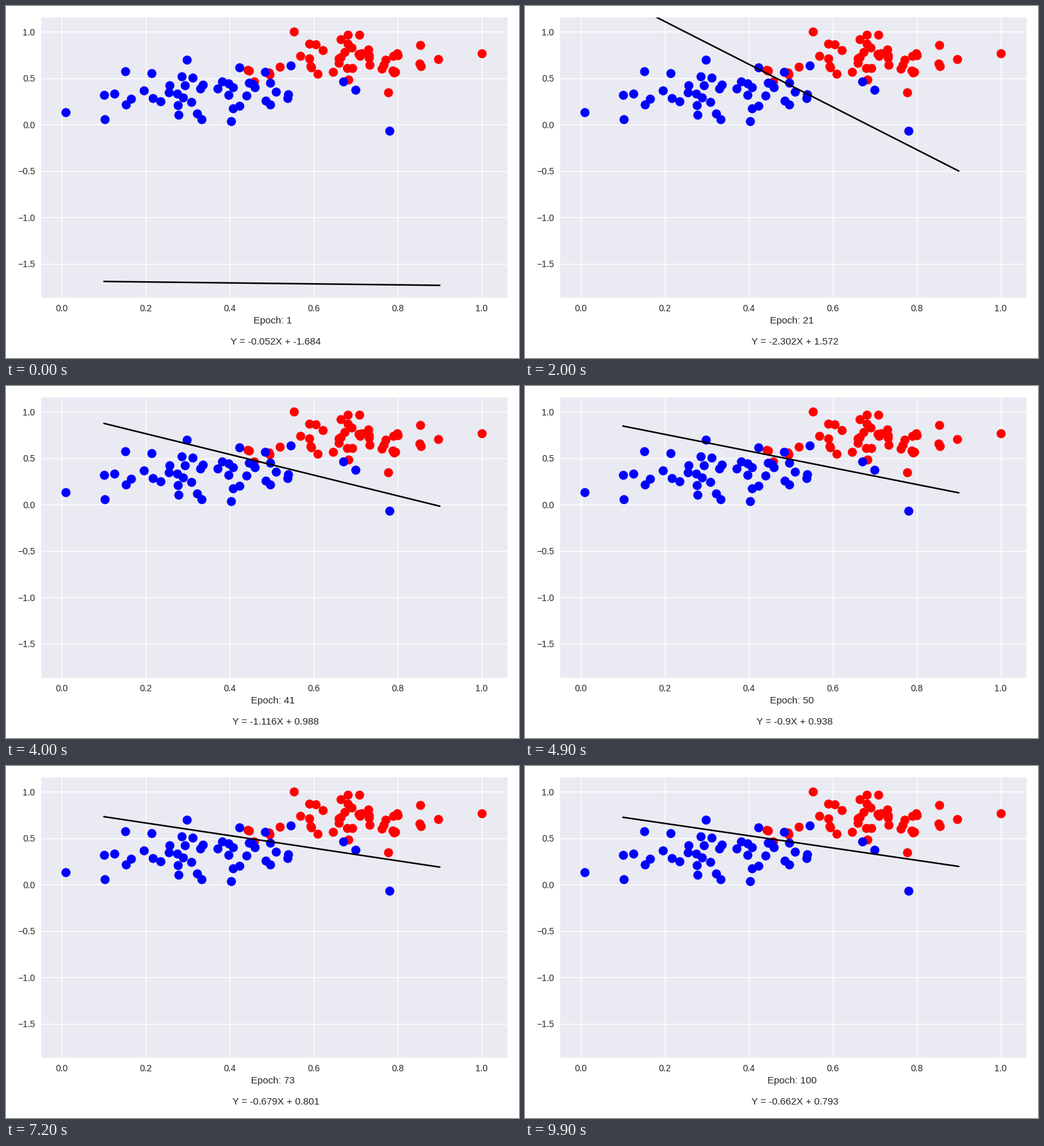
Animation of 800 by 550 pixels, one loop 10 s. Source, as a matplotlib script:

```python
import numpy as np
import matplotlib.pyplot as plt
from matplotlib.animation import FuncAnimation

W, H, DPI = 800, 550, 100
EPOCHS, RATE = 100, 0.01

plt.rcParams.update({
    "font.family": "Liberation Sans",
    "text.color": "0.15",
    "axes.labelcolor": "0.15",
    "axes.labelsize": 11,
    "axes.facecolor": "#EAEAF2",
    "axes.linewidth": 0,
    "axes.axisbelow": True,
    "axes.grid": True,
    "grid.color": "white",
    "grid.linewidth": 1,
    "lines.solid_capstyle": "round",
    "xtick.color": "0.15",
    "ytick.color": "0.15",
    "xtick.labelsize": 10,
    "ytick.labelsize": 10,
    "xtick.major.size": 0,
    "ytick.major.size": 0,
    "xtick.major.pad": 7,
    "ytick.major.pad": 7,
})

# x, y pairs of the two classes
BLUE = np.reshape([
    0.78051, -0.063669, 0.28774, 0.29139, 0.40714, 0.17878, 0.2923, 0.4217,
    0.50922, 0.35256, 0.27785, 0.10802, 0.27527, 0.33223, 0.43999, 0.31245,
    0.33557, 0.42984, 0.23448, 0.24986, 0.0084492, 0.13658, 0.12419, 0.33595,
    0.25644, 0.42624, 0.4591, 0.40426, 0.44547, 0.45117, 0.42218, 0.20118,
    0.49563, 0.21445, 0.30848, 0.24306, 0.39707, 0.44438, 0.32945, 0.39217,
    0.40739, 0.40271, 0.3106, 0.50702, 0.49638, 0.45384, 0.10073, 0.32053,
    0.69907, 0.37307, 0.29767, 0.69648, 0.15099, 0.57341, 0.16427, 0.27759,
    0.33259, 0.055964, 0.53741, 0.28637, 0.19503, 0.36879, 0.40278, 0.035148,
    0.21296, 0.55169, 0.48447, 0.56991, 0.25476, 0.34596, 0.21726, 0.28641,
    0.67078, 0.46538, 0.3815, 0.4622, 0.53838, 0.32774, 0.4849, 0.26071,
    0.37095, 0.38809, 0.54527, 0.63911, 0.32149, 0.12007, 0.42216, 0.61666,
    0.10194, 0.060408, 0.15254, 0.2168, 0.45558, 0.43769, 0.28488, 0.52142,
    0.27633, 0.21264, 0.39748, 0.31902,
], (-1, 2))
RED = np.reshape([
    0.5533, 1, 0.44274, 0.59205, 0.85176, 0.6612, 0.60436, 0.86605,
    0.68243, 0.48301, 1, 0.76815, 0.72989, 0.8107, 0.67377, 0.77975,
    0.78761, 0.58177, 0.71442, 0.7668, 0.49379, 0.54226, 0.78974, 0.74233,
    0.67905, 0.60921, 0.6642, 0.72519, 0.79396, 0.56789, 0.70758, 0.76022,
    0.59421, 0.61857, 0.49364, 0.56224, 0.77707, 0.35025, 0.79785, 0.76921,
    0.70876, 0.96764, 0.69176, 0.60865, 0.66408, 0.92075, 0.65973, 0.66666,
    0.64574, 0.56845, 0.89639, 0.7085, 0.85476, 0.63167, 0.62091, 0.80424,
    0.79057, 0.56108, 0.58935, 0.71582, 0.56846, 0.7406, 0.65912, 0.71548,
    0.70938, 0.74041, 0.59154, 0.62927, 0.45829, 0.4641, 0.79982, 0.74847,
    0.60974, 0.54757, 0.68127, 0.86985, 0.76694, 0.64736, 0.69048, 0.83058,
    0.68122, 0.96541, 0.73229, 0.64245, 0.76145, 0.60138, 0.58985, 0.86955,
    0.73145, 0.74516, 0.77029, 0.7014, 0.73156, 0.71782, 0.44556, 0.57991,
    0.85275, 0.85987, 0.51912, 0.62359,
], (-1, 2))


def train():
    """Perceptron: slope and intercept of the boundary after each epoch."""
    points = np.vstack([BLUE, RED])
    labels = np.repeat([1, 0], [len(BLUE), len(RED)])
    rng = np.random.RandomState(42)
    w = rng.rand(2)
    b = rng.rand() + points[0].max()
    lines = []
    for _ in range(EPOCHS):
        for p, label in zip(points, labels):
            step = RATE * (label - int(p @ w + b >= 0))
            w = w + step * p
            b += step
        lines.append((float(-w[0] / w[1]), float(-b / w[1])))
    return lines


LINES = train()

fig = plt.figure(figsize=(W / DPI, H / DPI), dpi=DPI, facecolor="white")
ax = fig.add_axes([55 / W, 1 - 456 / H, 727 / W, 438 / H])
ax.set_xlim(-0.0492, 1.0612)
ax.set_ylim(-1.866, 1.155)
ax.set_xticks(np.arange(0, 1.1, 0.2))
ax.set_yticks(np.arange(-1.5, 1.1, 0.5))

for pts, color in ((RED, "red"), (BLUE, "blue")):
    ax.plot(*pts.T, "o", color=color, ms=10.2, mew=0)

ends = np.array([0.1, 0.9])
boundary, = ax.plot([], [], color="black", lw=1.75)


def update(i):
    slope, intercept = LINES[i]
    boundary.set_data(ends, slope * ends + intercept)
    ax.set_xlabel(f"Epoch: {i + 1} \n\n Y = {round(slope, 3)}X + {round(intercept, 3)}")
    return boundary,


anim = FuncAnimation(fig, update, frames=EPOCHS, init_func=lambda: update(0),
                     interval=100, repeat=True, repeat_delay=0)
plt.show()
```
